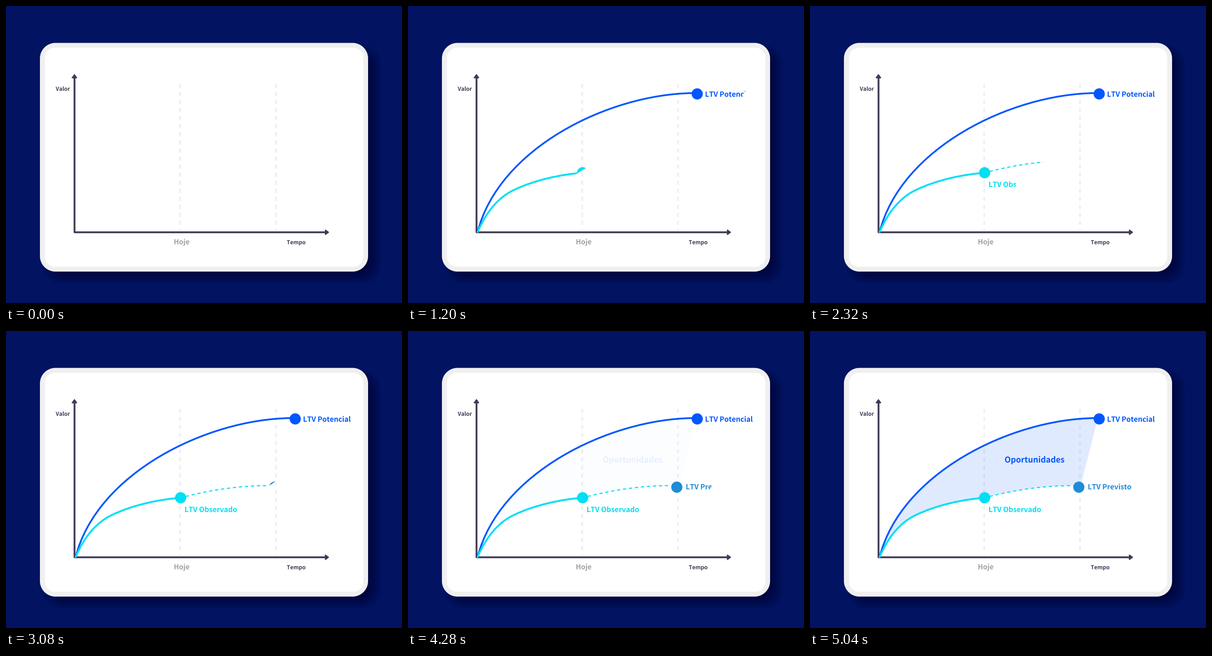
Recreate the animation shown at these times as a matplotlib script. Size 864 by 648 pixels, loop 7 s.

```python
import math

import matplotlib.pyplot as plt
import numpy as np
from matplotlib.animation import FuncAnimation
from matplotlib.patches import Circle, PathPatch, Polygon
from matplotlib.path import Path
from matplotlib.textpath import TextPath
from matplotlib.transforms import Affine2D

W, H = 864, 648
STEP, LOOP = 40, 7000

NAVY, INK, GRID, GREY = "#021362", "#403a56", "#f0f0f0", "#a2a2a4"
BLUE, CYAN, MID = "#0057ff", "#00dff3", "#1e8cd6"
FONT = dict(family="Noto Sans CJK JP", weight="bold")
CORNER = (150, 497)

fig = plt.figure(figsize=(W / 72, H / 72), dpi=72, facecolor=NAVY)
ax = fig.add_axes([0, 0, 1, 1])
ax.set_xlim(0, W)
ax.set_ylim(H, 0)
ax.axis("off")


def rounded(x0, y0, x1, y1, r, color, alpha=1):
    angle = np.linspace(0, 2 * math.pi, 96, endpoint=False) + math.pi / 96
    c, s = np.cos(angle), np.sin(angle)
    x = np.where(c > 0, x1 - r, x0 + r) + r * c
    y = np.where(s > 0, y1 - r, y0 + r) + r * s
    ax.add_patch(Polygon(np.column_stack([x, y]), fc=color, lw=0, alpha=alpha))


def label(text, x, y, size, color):
    place = Affine2D().scale(1, -1).translate(x, y) + ax.transData
    glyphs = TextPath((0, 0), text, size=size, prop=FONT)
    return ax.add_patch(PathPatch(glyphs, fc=color, lw=0, transform=place, zorder=6))


def stroke(points, color, width, **style):
    path = Path(points, [Path.MOVETO] + [Path.CURVE4] * (len(points) - 1))
    return ax.add_patch(PathPatch(path, fc="none", ec=color, lw=width, zorder=4, **style))


def dot(x, y, color):
    return ax.add_patch(Circle((x, y), 12.2, fc=color, lw=0, zorder=5))


# Card with its soft shadow
for grow in range(-13, 14, 2):
    rounded(92 - grow, 97 - grow, 806 + grow, 594 + grow, 34 + grow / 2, "#000428", 0.047)
rounded(74, 80.5, 790, 579.5, 34, GRID)
rounded(85, 91, 779.5, 569, 22, "white")

# Guides and axes
for x in (380, 588.5):
    ax.plot([x, x], [169.5, 490], color=GRID, lw=4, zorder=1,
            dashes=(2.2, 2.2), dash_capstyle="butt")
ax.plot([149.5, 149.5, 697], [154, 493.7, 493.7], color=INK, lw=4, zorder=2,
        solid_joinstyle="round", snap=False)
for x, y, turn in ((149.3, 150, 0), (703.5, 493.7, 90)):
    head = Affine2D().rotate_deg(turn).translate(x, y)
    tip = head.transform([(0, 0), (-4.8, 6.6), (4.8, 6.6)])
    ax.add_patch(Polygon(tip, fc=INK, ec=INK, lw=2.4, joinstyle="round", zorder=2))
label("Valor", 108.5, 185, 12, INK)
label("Tempo", 612.5, 519.8, 12, INK)
label("Hoje", 366, 520, 15.2, GREY)

# Curves and the area between them
top = [(152, 493), (198, 311), (437, 192), (622, 190)]
low = [(152, 493), (171, 448), (198, 417), (231, 401.5),
       (275, 380), (335, 367), (381, 364)]
ahead = [(392, 361), (450, 346), (515, 337), (572, 337.5)]

outline = top + [(628, 191), (590, 340)] + ahead[::-1] + low[::-1]
codes = ([Path.MOVETO] + [Path.CURVE4] * 3 + [Path.LINETO] * 3
         + [Path.CURVE4] * 3 + [Path.LINETO] + [Path.CURVE4] * 6)
area = ax.add_patch(PathPatch(Path(outline, codes), fc=BLUE, lw=0, zorder=3))
chance = label("Oportunidades", 424.5, 287, 17.6, BLUE)

potential = [stroke(top, BLUE, 3.8, capstyle="round"), dot(631, 191.8, BLUE)]
observed = [stroke(low, CYAN, 4, capstyle="round"), dot(381, 363.8, CYAN)]
forecast = [stroke(ahead, CYAN, 2.3, ls=(0, (3.1, 2.6)), capstyle="butt"),
            dot(586.5, 340.7, MID)]

# Each name with the time its wipe begins
names = [("LTV Potencial", 648, 198, BLUE, 640),
         ("LTV Observado", 389.5, 395, CYAN, 1910),
         ("LTV Previsto", 606, 345.5, MID, 3905)]
names = [(label(text, x, y, 15.5, color), x, y, start)
         for text, x, y, color, start in names]


def progress(t, start, end, power=1):
    return min(max((t - start) / (end - start), 0), 1) ** power


def reveal(artists, pivot, angle, shown):
    """Show only what lies up and left of a line through the pivot."""
    run = np.array([math.cos(angle), -math.sin(angle)]) * 2000
    side = np.array([-math.sin(angle), -math.cos(angle)]) * 2000
    p = np.array(pivot)
    half = Path([p - run, p + run, p + run + side, p - run + side, p - run])
    for artist in artists:
        artist.set_visible(shown)
        artist.set_clip_path(half, ax.transData)


def draw(frame):
    t = frame * STEP

    # Solid curves: an edge swings down about the chart's corner
    reveal(potential, CORNER, math.atan2(1, 1.75 * progress(t, 0, 800, 0.7)), t > 0)
    reveal(observed, CORNER, math.atan2(1, 2.05 * progress(t, 0, 2000, 0.41)), t > 0)

    # Dashed curve and names: a slanted edge slides right
    x = 384 + 236 * progress(t, 1500, 3800, 0.62)
    reveal(forecast, (x, 340), math.radians(35), t > 1500)
    for name, left, base, start in names:
        x = left - 2 + 124 * progress(t, start, start + 800)
        reveal([name], (x, base - 6), math.radians(61), t > start)

    fade = progress(t, 4210, 5040)
    area.set_alpha(0.12 * fade)
    chance.set_alpha(fade)
    return []


animation = FuncAnimation(fig, draw, frames=LOOP // STEP, interval=STEP,
                          repeat=True, repeat_delay=0, blit=False)
plt.show()
```
